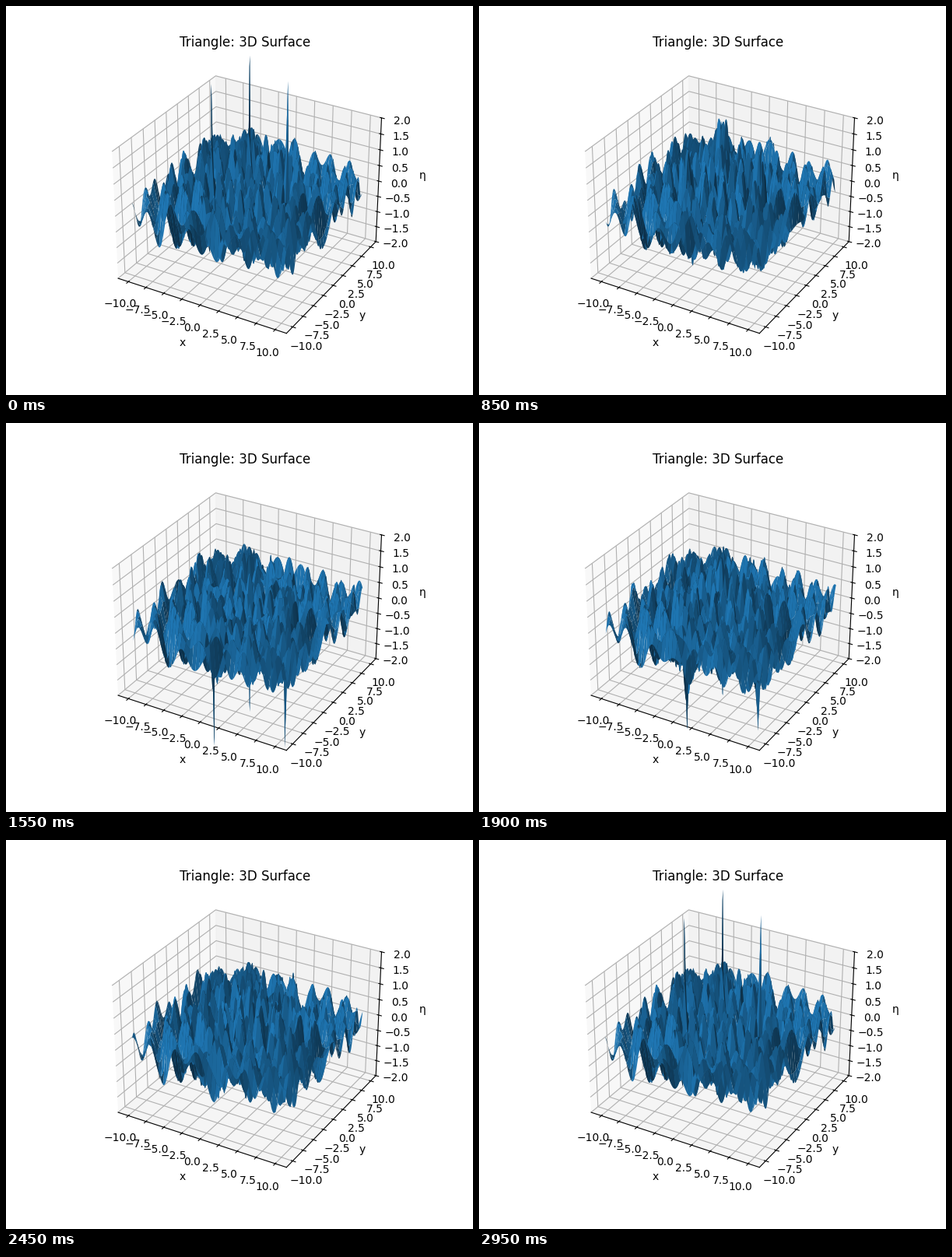
A matplotlib script that plays this animation: 600 px wide and 500 px high, repeating every 3 s.

```python
import numpy as np
import matplotlib.pyplot as plt
from matplotlib.animation import FuncAnimation

FRAMES = 60
INTERVAL = 50
WAVELENGTH = 2.0
K = 2 * np.pi / WAVELENGTH
RADIUS = 5.0
STRIDE = 5

# Three in-phase emitters on an equilateral triangle
angles = 2 * np.pi * np.arange(3) / 3
sources = RADIUS * np.column_stack([np.cos(angles), np.sin(angles)])

axis = np.linspace(-10, 10, 200)
X, Y = np.meshgrid(axis, axis)
distances = [np.hypot(X - sx, Y - sy) for sx, sy in sources]


def height(phase):
    return sum(np.cos(K * r - phase) / np.sqrt(r) for r in distances)


fig = plt.figure(figsize=(6, 5), dpi=100)
ax = fig.add_subplot(111, projection="3d")
ax.set_title("Triangle: 3D Surface")
ax.set_xlabel("x")
ax.set_ylabel("y")
ax.set_zlabel("η")
ax.set_zlim(-2, 2)
surface = None


def update(i):
    global surface
    if surface is not None:
        surface.remove()
    # The last step repeats the first phase
    phase = 2 * np.pi * i / (FRAMES - 1)
    surface = ax.plot_surface(X, Y, height(phase), color="C0",
                              rstride=STRIDE, cstride=STRIDE)
    return [surface]


anim = FuncAnimation(fig, update, frames=FRAMES, interval=INTERVAL,
                     init_func=lambda: [], repeat=True, repeat_delay=0)
plt.show()
```
